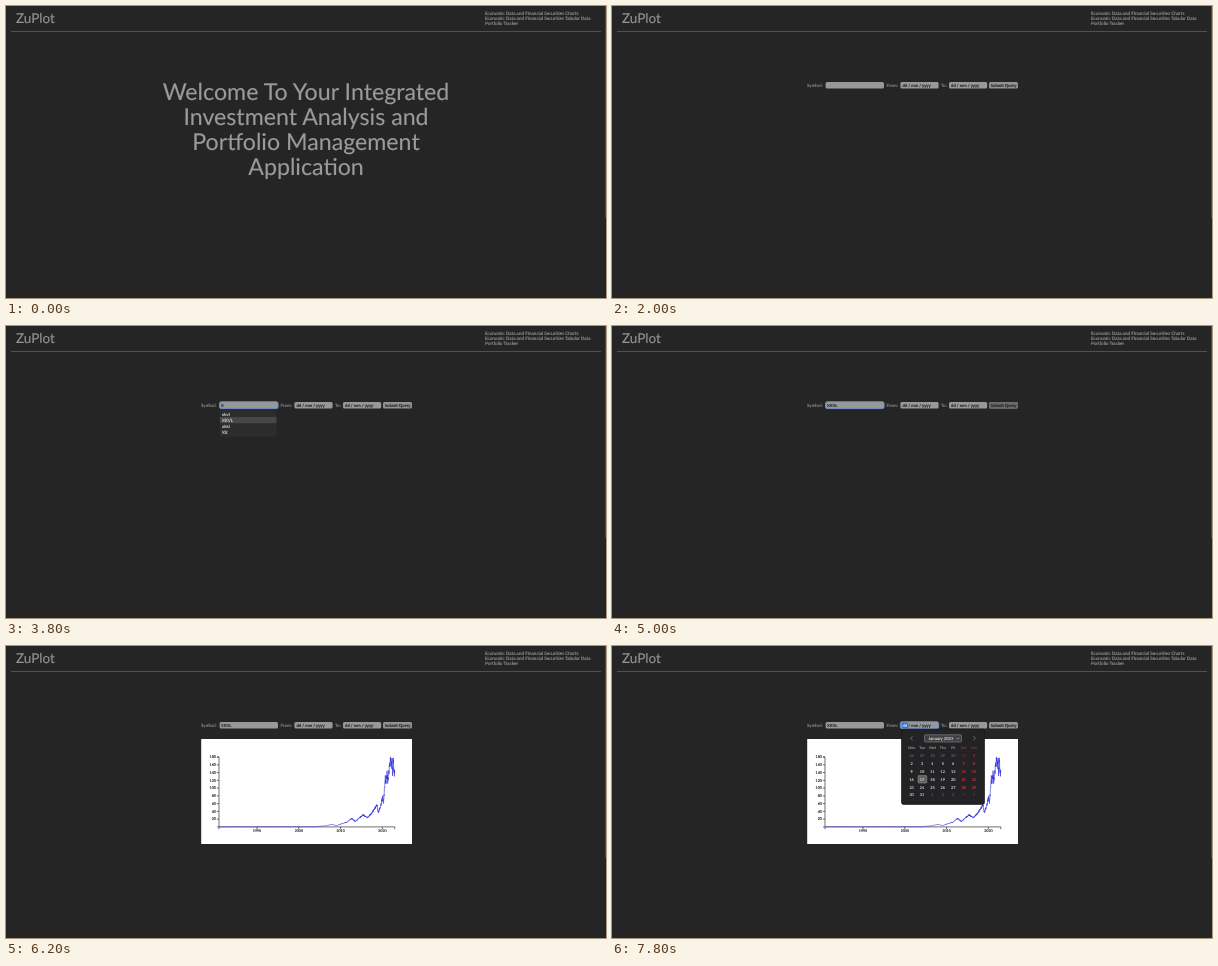
These frames come from a looping animation (600x292 px, 8 s). An HTML page:

```html
<!DOCTYPE html>
<html lang="en">
<head>
<meta charset="utf-8">
<title>Investment dashboard</title>
<style>
  html, body { margin: 0; width: 100%; height: 100%; overflow: hidden; background: #252525; }
  svg { display: block; width: 100%; height: 100%; }
  text { font-family: Lato, Carlito, sans-serif; text-rendering: geometricPrecision; white-space: pre; }
</style>
</head>
<body>
<svg id="stage" viewBox="0 0 600 292" xmlns="http://www.w3.org/2000/svg"></svg>
<script>
const NS = 'http://www.w3.org/2000/svg';
const LOOP = 8000;
const stage = document.getElementById('stage');
const layers = [];

function add(parent, tag, attrs) {
  const el = document.createElementNS(NS, tag);
  for (const key in attrs) el.setAttribute(key, attrs[key]);
  parent.appendChild(el);
  return el;
}

function box(parent, x, y, w, h, fill, more = {}) {
  return add(parent, 'rect', { x, y, width: w, height: h, fill, ...more });
}

// A hairline stroke in the fill colour keeps the letters from looking thin.
function label(parent, str, x, y, size, fill, anchor = 'start') {
  const el = add(parent, 'text', {
    x, y, 'font-size': size, fill, 'text-anchor': anchor, stroke: fill, 'stroke-width': 0.14
  });
  el.textContent = str;
  return el;
}

function line(parent, d, stroke, width) {
  return add(parent, 'path', { d, stroke, 'stroke-width': width, fill: 'none' });
}

// A group shown only from one time to another.
function layer(from, to) {
  const el = add(stage, 'g', {});
  layers.push({ el, from, to });
  return el;
}

function focusRing(parent, x, w) {
  box(parent, x, 75.7, w, 6.9, 'none', { rx: 1.8, stroke: '#7198d8', 'stroke-width': 0.9 });
}

function drawHeader() {
  label(stage, 'ZuPlot', 10, 17, 13.5, '#949494');
  ['Economic Data and Financial Securities Charts',
   'Economic Data and Financial Securities Tabular Data',
   'Portfolio Tracker'].forEach((s, i) => label(stage, s, 479, 9.4 + i * 4.95, 4.62, '#959595'));
  box(stage, 5, 25, 590, 1, '#514f50');
  box(stage, 599, 0, 1, 212, '#4a494a');
}

function drawWelcome() {
  const g = layer(0, 2000);
  ['Welcome To Your Integrated', 'Investment Analysis and', 'Portfolio Management', 'Application']
    .forEach((s, i) => label(g, s, 300, 94 + i * 25, 23.2, '#9a9a9a', 'middle'));

  const status = (str, from, to) => {
    const s = layer(from, to);
    box(s, 0, 286, 47, 6, '#2c2b2d');
    label(s, str, 1.5, 290.2, 3.8, '#858585');
  };
  status('127.0.0.1:8000/charts/', 1400, 1600);
  status('Waiting for 127.0.0.1…', 1600, 2000);
}

function drawForm() {
  const g = layer(2000, LOOP);
  const grey = '#989898', ink = '#1c1c1c';
  label(g, 'Symbol:', 195, 80.7, 4.5, '#898989');
  label(g, 'From:', 274.5, 80.7, 4.5, '#898989');
  label(g, 'To:', 329, 80.7, 4.5, '#898989');
  box(g, 213.6, 76, 58.4, 6.4, grey, { rx: 1.5 });
  for (const x of [288.4, 337]) {
    box(g, x, 76, 38.2, 6.4, grey, { rx: 1.5 });
    label(g, 'dd / mm / yyyy', x + 2.1, 80.7, 4.2, ink);
  }
  box(g, 377, 76, 29, 6.4, '#939393', { rx: 1.5 });
  box(layer(5000, 6000), 377, 76, 29, 6.4, '#6b6b6b', { rx: 1.5 });
  label(layer(2000, LOOP), 'Submit Query', 391.6, 80.7, 4.2, ink, 'middle');

  focusRing(layer(2600, 5600), 213.5, 58.6);
  label(layer(3000, 4800), 'X', 215, 80.7, 4.2, ink);
  label(layer(4800, LOOP), 'XKVL', 215, 80.7, 4.2, ink);
  box(layer(2600, 3000), 215.2, 77, 0.5, 4.6, ink);
  box(layer(3000, 3400), 218, 77, 0.5, 4.6, ink);
  box(layer(4800, 5000), 225.8, 77, 0.5, 4.6, ink);
}

function drawSuggestions() {
  box(layer(3200, 4600), 213.6, 83.2, 57, 27.4, '#2d2c2c');
  box(layer(3600, 3800), 214, 84.8, 56.4, 6.2, '#484748');
  box(layer(3800, 4600), 214, 91, 56.4, 6.2, '#484748');
  const g = layer(3200, 4600);
  ['xkvl', 'XKVL', 'xkkl', 'XK'].forEach((s, i) => label(g, s, 216, 89.5 + i * 6.2, 4.4, '#d2d2d2'));
}

function yearX(year) { return 251 + (year - 1990) * 4.18; }
function priceY(v) { return 180.9 - v * 0.388; }

function pricePath() {
  const keys = [[1981, .3], [2004, .5], [2006.5, 3], [2007.9, 6.5], [2009, 3.4], [2010.5, 9],
    [2011.5, 12], [2012.7, 22], [2013.5, 14], [2014.5, 23], [2015.3, 31], [2016.4, 23.5],
    [2017.5, 36], [2018.7, 56], [2019, 37], [2019.7, 58], [2020.1, 80], [2020.25, 58],
    [2020.7, 130], [2020.8, 110], [2021.1, 141], [2021.25, 119], [2021.7, 154], [2022, 179],
    [2022.2, 155], [2022.3, 176], [2022.45, 132], [2022.6, 172], [2022.85, 136], [2023, 146]];
  let seed = 7, d = '';
  const rand = () => (seed = (seed * 16807) % 2147483647) / 2147483647 - 0.5;
  for (let i = 1; i < keys.length; i++) {
    const [x0, v0] = keys[i - 1], [x1, v1] = keys[i];
    const n = Math.max(4, Math.round((x1 - x0) * 32));
    for (let k = 0; k < n; k++) {
      const p = k / n;
      const v = Math.min(180, (v0 + (v1 - v0) * p) * (1 + rand() * 0.14));
      d += (d ? 'L' : 'M') + yearX(x0 + (x1 - x0) * p).toFixed(2) + ' ' + priceY(v).toFixed(2);
    }
  }
  return d;
}

function drawChart() {
  const g = layer(6200, LOOP);
  box(g, 195.2, 93, 210.8, 105, '#fff');
  let axes = 'M211 111H213V180.9H211M213 183.2V180.9H388.8V183.2';
  for (let v = 20; v <= 180; v += 20) {
    axes += `M210.8 ${priceY(v)}H213`;
    label(g, v, 210, priceY(v) + 1.3, 3.7, '#222', 'end');
  }
  for (let y = 1990; y <= 2020; y += 10) {
    axes += `M${yearX(y)} 180.9v2.3`;
    label(g, y, yearX(y), 186.3, 3.6, '#222', 'middle');
  }
  line(g, axes, '#333', 0.7);
  line(g, pricePath(), '#2a2ae0', 0.6);
}

function drawCalendar() {
  const focus = layer(7200, LOOP);
  focusRing(focus, 288.3, 38.4);
  box(focus, 289.9, 76.6, 6, 5.3, '#2f70d6', { rx: 0.6 });
  label(focus, 'dd', 290.5, 80.7, 4.2, '#dce6f8');

  const g = layer(7400, LOOP);
  box(g, 289.5, 83.2, 83, 75.2, '#232224', { rx: 2, stroke: '#19181a', 'stroke-width': 0.7 });
  const hover = box(g, 312.5, 88.8, 37, 7.2, '#403f41', { rx: 1, stroke: '#8b8b8b', 'stroke-width': 0.6 });
  label(g, 'January 2023', 329, 94, 4.2, '#cfcfcf', 'middle');
  line(g, 'M344.3 91.6l1.6 1.6l1.6-1.6', '#bbb', 0.6);
  line(g, 'M300.5 90.2l-1.9 2l1.9 2M361.5 90.2l1.9 2l-1.9 2', '#a5a5a5', 0.6);

  const colX = c => 299.6 + c * 10.4;
  ['Mon', 'Tue', 'Wed', 'Thu', 'Fri', 'Sat', 'Sun'].forEach((s, c) =>
    label(g, s, colX(c), 103.4, 3.6, c > 4 ? '#853638' : '#8c8c8c', 'middle'));
  box(g, 306, 129.6, 8.8, 7.4, '#626262', { rx: 0.8, stroke: '#999', 'stroke-width': 0.5 });
  for (let i = 0; i < 42; i++) {
    const c = i % 7, day = new Date(2022, 11, 26 + i);
    const inside = day.getMonth() === 0 && i > 5;
    const fill = c > 4 ? (inside ? '#c23a3d' : '#6a3032') : (inside ? '#d0d0d0' : '#5d5d5d');
    label(g, day.getDate(), colX(c), 111.4 + Math.floor(i / 7) * 7.8, 3.8, fill, 'middle');
  }
  return { panel: g, hover };
}

drawHeader();
drawWelcome();
drawForm();
drawSuggestions();
drawChart();
const calendar = drawCalendar();

function render(t) {
  for (const { el, from, to } of layers) {
    el.setAttribute('visibility', t >= from && t < to ? 'visible' : 'hidden');
  }
  calendar.panel.setAttribute('opacity', t < 7600 ? 0.85 : 1);
  calendar.hover.setAttribute('opacity', t < 7800 ? 0.35 : 1);
}

const start = performance.now();
function tick() {
  render((performance.now() - start) % LOOP);
  requestAnimationFrame(tick);
}
tick();
</script>
</body>
</html>
```
